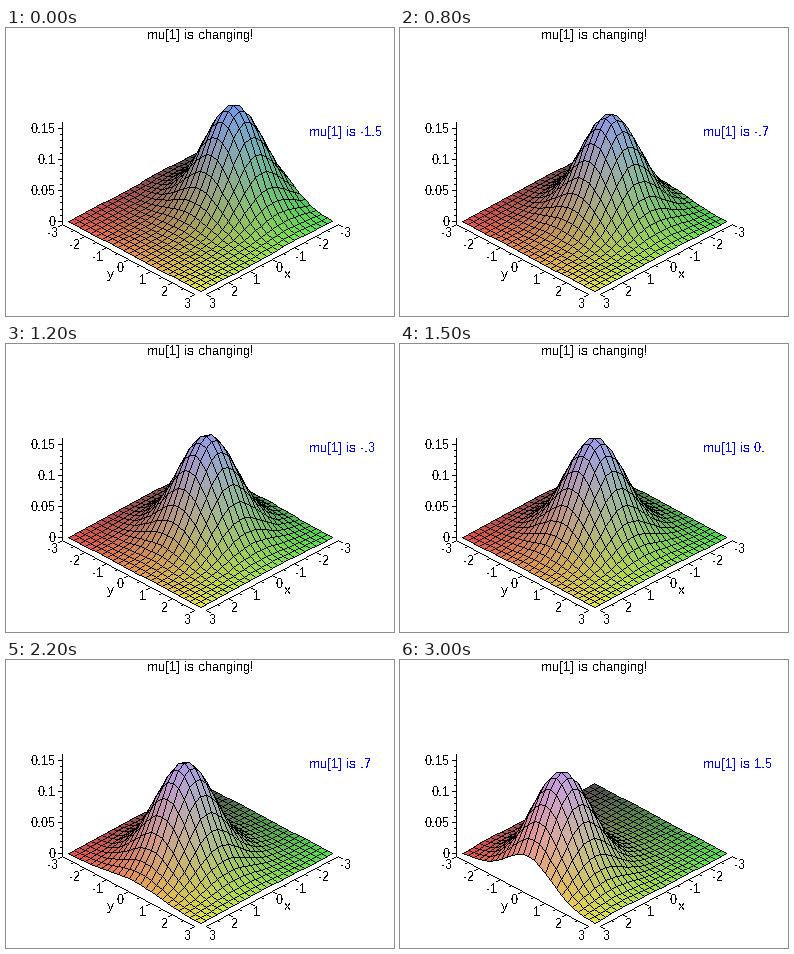
Animation of 388x288 px, one loop 3.1 s. Source, as a matplotlib script:

```python
import numpy as np
import matplotlib.pyplot as plt
from matplotlib.animation import FuncAnimation

W, H, DPI = 388, 288, 100
FRAMES, STEP_MS = 31, 100
GRID, LIM = 25, 3
PEAK = 1 / (2 * np.pi)
EDGE = LIM + 0.26            # where the axes stand, just off the surface
Z_AXIS = 56

plt.rcParams.update({
    "font.family": "Liberation Sans",
    "font.size": 13 * 72 / DPI,
    "text.antialiased": False,
    "text.hinting": "native",
    "text.hinting_factor": 1,
})

fig = plt.figure(figsize=(W / DPI, H / DPI), dpi=DPI, facecolor="white")


def project(x, y, z=0.0):
    """Map a point in space to whole stage pixels."""
    sx = 194 + 22 * (y - x)
    sy = 193 + 11.67 * (x + y) - 620 * z
    points = np.stack(np.broadcast_arrays(sx, sy), axis=-1)
    return np.floor(points + 0.5).astype(int)


def draw_line(img, p, q):
    """Hard-edged black line, one pixel wide."""
    (px, py), (qx, qy) = p, q
    n = max(abs(qx - px), abs(qy - py), 1)
    t = np.arange(n + 1) / n
    cols = np.floor(px + (qx - px) * t + 0.5).astype(int)
    rows = np.floor(py + (qy - py) * t + 0.5).astype(int)
    img[rows, cols] = 0


def draw_cell(img, quad, color):
    """Fill a quadrilateral by the even-odd rule and outline it."""
    left, top = quad.min(axis=0)
    right, bottom = quad.max(axis=0) + 1
    px = np.arange(left, right)
    py = np.arange(top, bottom)[:, None]
    inside = np.zeros((bottom - top, right - left), bool)
    corners = quad.tolist()
    sides = list(zip(corners, corners[1:] + corners[:1]))
    for (ax, ay), (bx, by) in sides:
        if ay != by:
            cross = ax + (py - ay) * (bx - ax) / (by - ay)
            inside ^= ((ay > py) != (by > py)) & (px < cross)
    img[top:bottom, left:right][inside] = color
    for p, q in sides:
        draw_line(img, p, q)


def draw_tick(img, start, dx, dy, major):
    x, y = start
    size = 2 if major else 1
    draw_line(img, (x, y), (x + dx * size, y + dy * size))


def draw_axes(img):
    corner = project(EDGE, -LIM)
    draw_line(img, (Z_AXIS, 94), (Z_AXIS, corner[1]))
    draw_line(img, corner, project(EDGE, LIM))
    draw_line(img, project(LIM, EDGE), project(-LIM, EDGE))
    for i in range(16):
        draw_tick(img, (Z_AXIS, round(193 - 6.2 * i)), -2, 0, i % 5 == 0)
    for v in np.arange(-LIM, LIM + 0.1, 0.5):
        major = v == int(v)
        draw_tick(img, project(EDGE, v), -2, 1, major)
        draw_tick(img, project(v, EDGE), 2, 1, major)


def label(x, mid, text, ha="left", color="black"):
    """Put text with its digits centred on the height mid."""
    return fig.text(x / W, 1 - (mid + 4.5) / H, text, ha=ha, va="baseline",
                    color=color)


def add_labels():
    label(141, 6.5, "mu[1] is changing!")
    for i, text in enumerate(["0", "0.05", "0.1", "0.15"]):
        label(50, 193.5 - 31 * i, text, "right")
    for v in range(-LIM, LIM + 1):
        mid = 240 + 11.67 * v
        label(114 + 22.3 * v, mid, str(v), "center")
        label(273 - 22.3 * v, mid, str(v), "center")
    label(101, 245.5, "y")
    label(278, 245.5, "x")


def cells(a):
    """Corner values of every grid cell, from the farthest to the nearest."""
    quad = np.stack([a[:-1, :-1], a[1:, :-1], a[1:, 1:], a[:-1, 1:]], axis=2)
    return quad.reshape(-1, 4, a.shape[-1])[order]


def shade(frac):
    return 255 * (0.3 + 0.6 * frac)


def mu_text(tenths):
    if tenths == 0:
        return "0."
    text = f"{tenths / 10:.1f}"
    return text.replace("0.", ".", 1) if abs(tenths) < 10 else text


axis = np.linspace(-LIM, LIM, GRID)
gx, gy = np.meshgrid(axis, axis, indexing="ij")
order = np.argsort(np.indices((GRID - 1, GRID - 1)).sum(axis=0).ravel(),
                   kind="stable")

backdrop = np.full((H, W, 3), 255, np.uint8)
draw_axes(backdrop)
add_labels()
readout = label(303, 103.5, "", color="blue")
picture = fig.figimage(backdrop, origin="upper", zorder=-1)


def update(frame):
    tenths = frame - 15
    gz = PEAK * np.exp(-((gx - tenths / 10) ** 2 + gy ** 2) / 2)
    rgb = np.stack([shade((gx + LIM) / (2 * LIM)),
                    shade((gy + LIM) / (2 * LIM)),
                    shade(gz / PEAK)], axis=-1)
    colors = cells(rgb).mean(axis=1).astype(np.uint8)
    img = backdrop.copy()
    for quad, color in zip(cells(project(gx, gy, gz)), colors):
        draw_cell(img, quad, color)
    picture.set_data(img)
    readout.set_text("mu[1] is " + mu_text(tenths))
    return picture, readout


anim = FuncAnimation(fig, update, frames=FRAMES, interval=STEP_MS,
                     repeat=True, blit=False)
plt.show()
```
